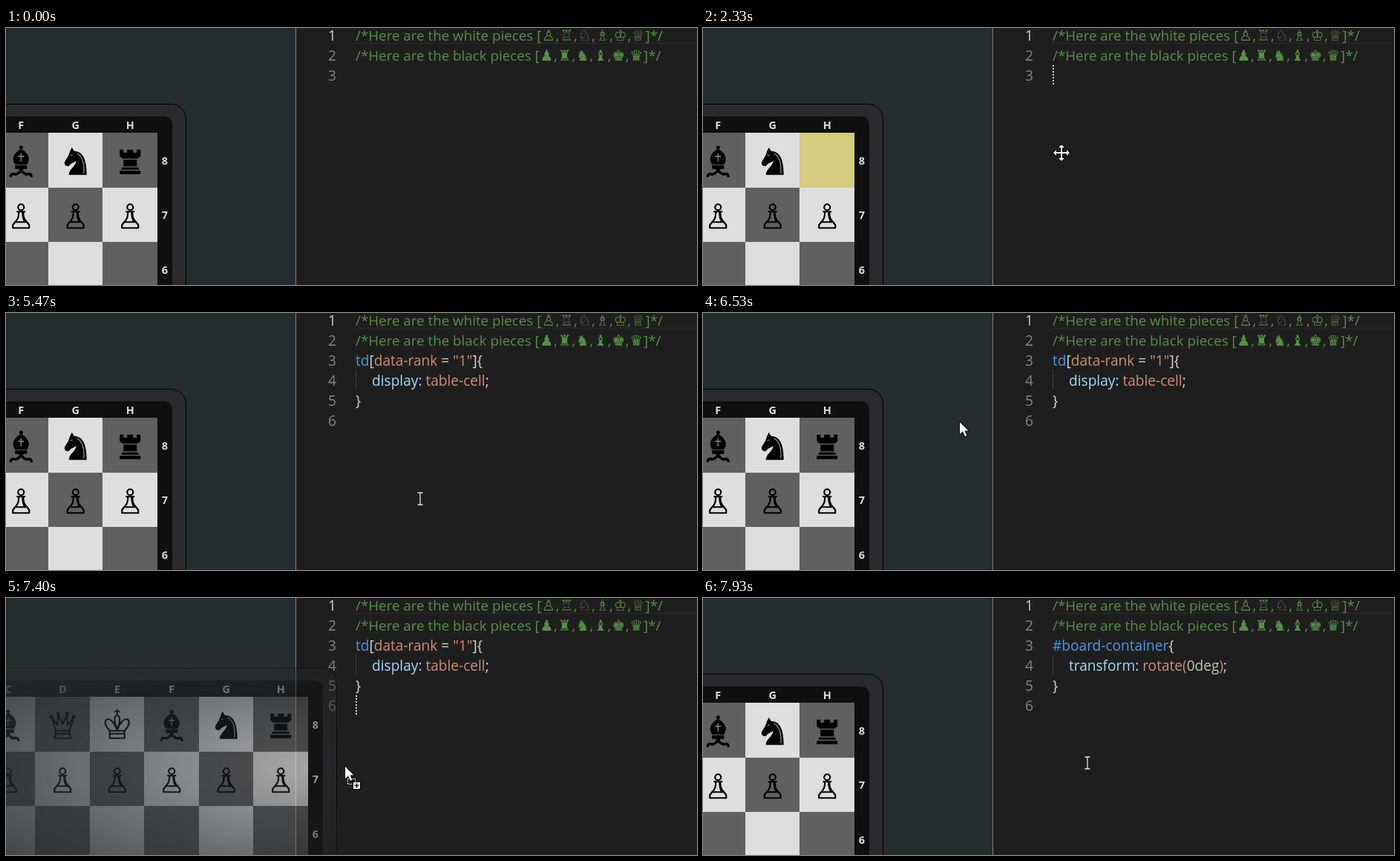
Write an HTML page that moves like this. It is 931 px wide and 346 px high and loops after 8 s.

```html
<!DOCTYPE html>
<html lang="en">
<head>
<meta charset="utf-8">
<title>Chess board drag and drop</title>
<style>
  html, body { margin: 0; width: 100%; height: 100%; overflow: hidden; background: #1e1e1e; }
  svg { display: block; }
  text { font: 19.1px "Open Sans", "Noto Sans", sans-serif; fill: #d4d4d4; white-space: pre; }
  .label { font-size: 14.5px; font-weight: bold; fill: #dcdcdc; text-anchor: middle; }
  .num { fill: #858585; text-anchor: end; }
  .active { fill: #d0d0d0; }
  .comment { font-size: 18.8px; fill: #588e47; }
  .sel { fill: #4f97dd; }
  .prop { fill: #9cdcfe; }
  .val { fill: #d08d70; }
  .lit { fill: #b5cea8; }
  .glyph { font: 20px "DejaVu Sans", sans-serif; }
  .line { fill: none; stroke: #000; stroke-width: 2.2; stroke-linejoin: round; }
  .foot { fill: none; stroke: #000; stroke-width: 3.6; }
  .dots { fill: none; stroke: #000; stroke-width: 5; stroke-linecap: round; }
  .cut { fill: none; stroke: #8c8c8c; stroke-width: 1.3; }
  .arrow { fill: #fff; stroke: #000; paint-order: stroke; stroke-width: 1.6; }
</style>
</head>
<body>
<svg width="931" height="346" viewBox="0 0 931 346">
  <defs>
    <radialGradient id="fade" gradientUnits="userSpaceOnUse" cx="0" cy="0" r="1"
      gradientTransform="translate(248 236) scale(700 250)">
      <stop offset="0" stop-color="#fff" stop-opacity=".75"/>
      <stop offset="1" stop-color="#fff" stop-opacity="0"/>
    </radialGradient>
    <mask id="veil" maskUnits="userSpaceOnUse" x="-500" y="0" width="900" height="900">
      <rect x="-500" width="900" height="900" fill="url(#fade)"/>
    </mask>
    <path id="tip" class="arrow" d="M0 0V16L4 12.5 7 19 9.5 18 6.5 11.5H11.5Z"/>
    <path id="ban" d="M8 0A8 8 0 1 1-8 0A8 8 0 1 1 8 0ZM-5.5-5.5L5.5 5.5" fill="none"/>
  </defs>
  <rect width="390" height="346" fill="#252c2f"/>
  <path d="M390.5 0V346" stroke="#7c7f80"/>
  <path d="M471 20.5H931" stroke="#2b2b2b"/>
  <g id="code"></g>
  <path id="caret" stroke="#d0d0d0" stroke-width="2" stroke-dasharray="2 2"/>
  <g id="shift"><g id="board"></g></g>
  <g id="rookGhost" opacity=".7"></g>
  <g id="rankGhost" opacity=".7">
    <rect x="204" y="215" width="20" height="73" fill="#0f0f0f"/>
    <text class="label" x="214" y="257">7</text>
  </g>
  <g id="cursor">
    <path class="arrow" data-kind="move" d="M0-11l4 4h-3v6h6v-3l4 4-4 4v-3h-6v6h3l-4 4-4-4h3v-6h-6v3l-4-4 4-4v3h6v-6h-3z"/>
    <path data-kind="beam" d="M-3.5-8H3.5M0-8V8M-3.5 8H3.5" stroke="#e4e4e4" stroke-width="1.3"/>
    <g data-kind="deny">
      <use href="#ban" stroke="#fff" stroke-width="4"/>
      <use href="#ban" stroke="#000" stroke-width="2"/>
    </g>
    <use data-kind="arrow" href="#tip"/>
    <g data-kind="copy" transform="translate(6 -1)">
      <rect x="3.5" y="16.5" width="10" height="7" fill="none" stroke="#fff" stroke-dasharray="2 1"/>
      <use href="#tip"/>
      <rect x="10.5" y="20.5" width="10" height="10" fill="#fff" stroke="#000"/>
      <path d="M12.5 25.5H18.5M15.5 22.5V28.5" stroke="#000" stroke-width="1.6"/>
    </g>
  </g>
</svg>
<script>
const $ = id => document.getElementById(id);
const show = (el, on) => el.style.display = on ? '' : 'none';
const move = (el, x, y) => el.setAttribute('transform', `translate(${x} ${y})`);

// Chess pieces, drawn around the centre of a cell
const shape = (d, kind = '') => `<path class="${kind}" d="${d}"/>`;
const rook = shape('M-14-14h5v4h5v-4h8v4h5v-4h5v9l-4 3h-20l-4-3zM-9-.5h18v9h-18zM-11 10h22l1 3h-24zM-14 14.5h28v4.5h-28z');
const knight = shape('M-5-17L-2-12C8-12 15-4 15 20H-9C-9 12 0 9 1 1C-3 4-6 4-8 7C-10 10-15 8-15 4C-14-1-9-4-8-11Z') +
  shape('M2-9C9-5 12 5 11 18M-7-6l3-1', 'cut');
const bishop = shape('M0-15C11-9 13-1 8 6H-8C-13-1-11-9 0-15ZM-8 7H8V12H-8Z') + shape('M0-17h.1', 'dots') +
  shape('M2 11C-2 17-5 20-9 19S-14 20-14 23M-2 11C2 17 5 20 9 19S14 20 14 23', 'foot') + shape('M0-9V2M-4-5H4', 'cut');
const pawn = shape('M-4-10A4 4 0 1 1 4-10A4 4 0 1 1-4-10ZM-6-4H6M-3-4C-3 3-4 6-8 10H8C4 6 3 3 3-4M-8 10L-11 14V18H11V14L8 10', 'line') +
  shape('M1-4H3C3 3 4 6 8 10H4C2 6 1 3 1-4Z');
const king = shape('M0-20V-12M-3.5-17H3.5M0 8C-8-14-21-8-14 4L-10 9H10L14 4C21-8 8-14 0 8ZM0 6C-5-4-4-11 0-12C4-11 5-4 0 6M-10 13H10M-10 9V19H10V9', 'line');
const queen = shape('M-9 9L-15-9L-7 1L-6-13L0 0L6-13L7 1L15-9L9 9ZM-9 13H9M-9 9L-11 19H11L9 9', 'line') +
  shape('M-15-10h.1M-6-14h.1M6-14h.1M15-10h.1', 'dots');
const backRank = [rook, knight, bishop, queen, king, bishop, knight, rook];

function drawBoard() {
  const size = 73.5, left = -384, top = 141;
  let out = '<rect x="-423.5" y="102.5" width="666" height="666" rx="20" fill="#2a292e" stroke="#000"/>' +
    '<rect x="-404" y="119" width="628" height="632" rx="10" fill="#0f0f0f"/>';
  for (let r = 0; r < 4; r++) {
    const y = top + r * size, name = 8 - r;
    out += `<text class="label" id="rank${name}" x="214" y="${y + 42.5}">${name}</text>`;
    for (let c = 0; c < 8; c++) {
      const x = left + c * size, x0 = Math.floor(x), y0 = Math.round(y);
      const corner = !r && c == 7;
      const piece = [backRank[c], pawn][r] || '';
      out += `<rect ${corner ? 'id="corner"' : ''} x="${x0}" y="${y0}" width="${Math.floor(x + size) - x0}"
        height="${Math.round(y + size) - y0}" fill="${(r + c) % 2 ? '#606060' : '#dedede'}"/>
        <g ${corner ? 'id="rook"' : ''} transform="translate(${x + size / 2} ${y + size / 2})">${piece}</g>`;
      if (!r) out += `<text class="label" x="${x + size / 2}" y="136">${'ABCDEFGH'[c]}</text>`;
    }
  }
  return out;
}

// Editor text
const span = (kind, text) => `<tspan class="${kind}">${text}</tspan>`;
const row = (n, html = '', x = 471, kind = '') => {
  const y = 27 * n - 10;
  return `<text class="num ${n == 1 ? 'active' : ''}" x="445" y="${y}">${n}</text>
    <text class="${kind}" x="${x}" y="${y}">${html}</text>`;
};
const glyph = (g, after) => `<tspan class="glyph" dx=".8">${g}</tspan><tspan dx=".8">${after}</tspan>`;
const comment = (n, side, set) =>
  row(n, `/*Here are the ${side} pieces [` + [...set].map((g, i) => glyph(g, i < 5 ? ',' : ']*/')).join(''), 471, 'comment');
const rule = (selector, ...body) => {
  const end = 4 + body.length;
  return `<g>${row(3, selector + '{')}` +
    body.map(([prop, value], i) => row(4 + i, span('prop', prop + ': ') + value + ';', 493)).join('') +
    `${row(end, '}')}${row(end + 1)}<path d="M471.5 76V${27 * end - 32}" stroke="#404040"/></g>`;
};

$('board').innerHTML = drawBoard();
$('rookGhost').innerHTML = `<g transform="translate(167 178)">${rook}</g>`;
$('code').innerHTML = `<g>${row(3)}</g>` +
  rule(span('sel', '#black-H-rook'), ['content', glyph('♜', '')], ['font-size', span('lit', '3vw')],
    ['font-weight', span('val', 'normal')], ['opacity', span('lit', '100%')]) +
  rule(span('sel', 'td') + '[' + span('val', 'data-rank') + ' = ' + span('val', '"1"') + ']',
    ['display', span('val', 'table-cell')]) +
  rule(span('sel', '#board-container'),
    ['transform', span('val', 'rotate(') + span('lit', '0deg') + span('val', ')')]);
const blocks = [...$('code').children];
$('code').insertAdjacentHTML('beforeend', comment(1, 'white', '♙♖♘♗♔♕') + comment(2, 'black', '♟♜♞♝♚♛'));

// Pointer path: [tick, x, y] at 15 ticks per second
const path = [
  [4, 185, 335], [6, 176, 265], [9, 161, 178], [17, 161, 178], [20, 190, 192], [23, 320, 195], [25, 430, 180],
  [27, 483, 168], [39, 483, 168], [41, 420, 205], [43, 285, 278], [44, 254, 297], [51, 254, 297], [56, 228, 262],
  [60, 217, 241], [65, 217, 241], [67, 290, 246], [70, 470, 243], [73, 552, 244], [75, 552, 244], [76, 558, 250],
  [82, 558, 250], [86, 440, 62], [90, 287, 180], [94, 360, 338], [97, 455, 62], [99, 237, 232], [100, 248, 236],
  [105, 248, 236], [107, 286, 235], [109, 365, 231], [111, 451, 228], [113, 495, 225], [115, 512, 223],
  [118, 512, 223], [119, 518, 222]
];
function pointer(k) {
  const i = path.findIndex(p => p[0] >= k);
  const b = path[i], a = path[Math.max(i - 1, 0)];
  const u = b[0] > a[0] ? (k - a[0]) / (b[0] - a[0]) : 0;
  return [a[1] + (b[1] - a[1]) * u, a[2] + (b[2] - a[2]) * u];
}

function draw(now) {
  const k = Math.floor((now % 8000 + 4) * 15 / 1000) % 120;
  const within = (a, b) => k >= a && k < b;
  const [x, y] = pointer(k);
  const rookDrag = within(18, 36), rankDrag = within(66, 76), boardDrag = within(106, 119);
  const editor = x > 390;

  const block = k < 36 ? 0 : k < 76 ? 1 : k < 119 ? 2 : 3;
  blocks.forEach((el, i) => show(el, i == block));

  $('corner').setAttribute('fill', within(9, 42) ? '#d3cc7e' : '#606060');
  show($('rook'), !rookDrag);
  show($('rank7'), !rankDrag);
  show($('rookGhost'), within(18, 35));
  move($('rookGhost'), x - 161, y - 178);
  show($('rankGhost'), rankDrag);
  move($('rankGhost'), x - 217, y - 241);

  show($('board'), k != 118);
  move($('shift'), boardDrag ? x - 248 : 0, boardDrag ? y - 236 : 0);
  if (boardDrag) $('board').setAttribute('mask', 'url(#veil)');
  else $('board').removeAttribute('mask');

  show($('caret'), editor && (rookDrag || rankDrag || boardDrag));
  const top = 27 * (rookDrag ? 3 : rankDrag ? 9 : 6) - 31;
  $('caret').setAttribute('d', `M472 ${top}V${top + 26}`);

  let kind = editor ? 'beam' : x < 250 ? 'move' : 'arrow';
  if (rookDrag) kind = editor || x < 204 ? 'move' : 'deny';
  if (rankDrag || boardDrag) kind = editor ? 'copy' : 'deny';
  show($('cursor'), k >= 4);
  move($('cursor'), Math.round(x), Math.round(y));
  for (const el of $('cursor').children) show(el, el.dataset.kind == kind);
}

function loop() {
  draw(performance.now());
  requestAnimationFrame(loop);
}
loop();
</script>
</body>
</html>
```
